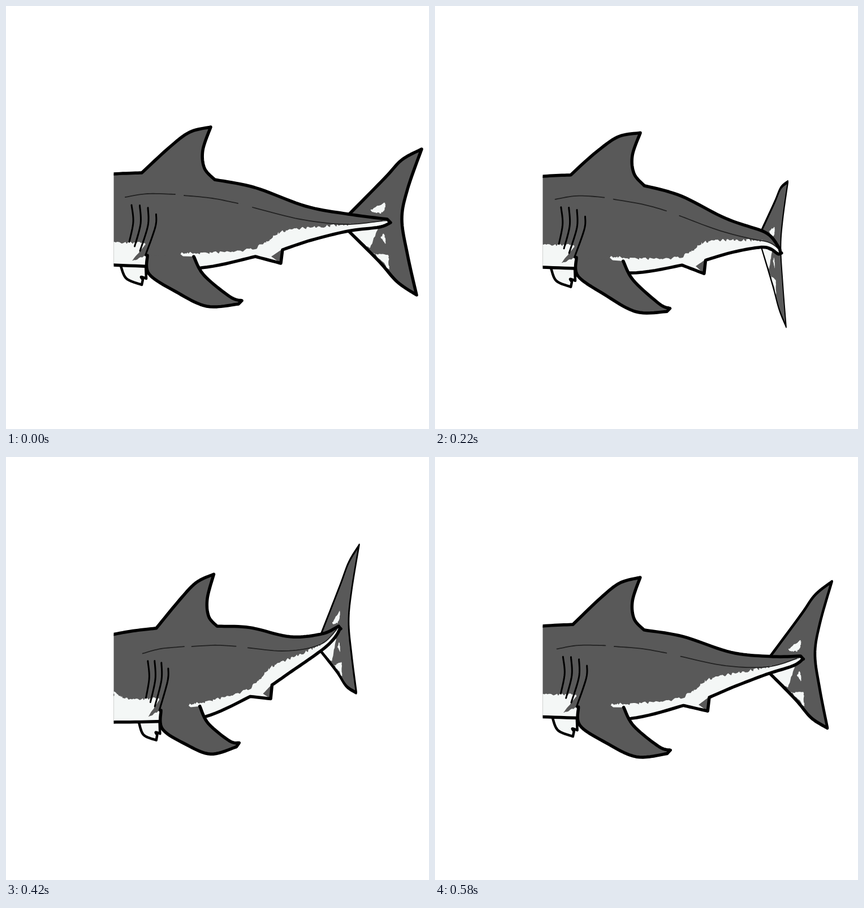
Write an HTML page with a canvas that moves like this. It is 748 px wide and 748 px high and loops after 600 ms.

```html
<!DOCTYPE html>
<html lang="en">
<head>
<meta charset="utf-8">
<title>Swimming shark</title>
<style>
html, body { margin: 0; width: 100%; height: 100%; overflow: hidden; background: #fff; }
canvas { display: block; width: 748px; height: 748px; }
</style>
</head>
<body>
<canvas id="stage" width="748" height="748"></canvas>
<script>
const ctx = document.getElementById('stage').getContext('2d');
const GREY = '#595959', WHITE = '#f4f7f6', INK = '#000';
const LOOP = 600, STEP = 20, CUT = 190.5, ROOT = 607;

// Monotone cubic interpolation
function pchip(xs, ys) {
  const n = xs.length, d = [], m = [];
  for (let i = 0; i < n - 1; i++) d[i] = (ys[i + 1] - ys[i]) / (xs[i + 1] - xs[i]);
  for (let i = 1; i < n - 1; i++) {
    const turn = d[i - 1] * d[i];
    m[i] = turn > 0 ? 2 * turn / (d[i - 1] + d[i]) : 0;
  }
  m[0] = d[0];
  m[n - 1] = d[n - 2];
  return x => {
    if (x <= xs[0]) return ys[0];
    if (x >= xs[n - 1]) return ys[n - 1];
    let i = 0;
    while (x > xs[i + 1]) i++;
    const h = xs[i + 1] - xs[i], u = (x - xs[i]) / h, v = 1 - u;
    return ys[i] * (1 + 2 * u) * v * v + ys[i + 1] * u * u * (3 - 2 * u)
      + h * u * v * (m[i] * v - m[i + 1] * u);
  };
}

// Full bend of the spine, downwards and upwards
const SPINE = [140, 250, 370, 487, 605, 678];
const bend = (dx, dy, shear) => ({ dx: pchip(SPINE, dx), dy: pchip(SPINE, dy), shear });
const DOWN = bend([14, 0, 2, -19, -54, -96], [8, 7, 20, 34, 53, 77], .3);
const UP = bend([43, 24, 4, -21, -63, -110], [13, 7, -8, -32, -70, -99], -.39);

// Time, then amount of bend at chest, tail root and tail tip, then tail squeeze
const keys = [
  [0, 0, 0, 0, 0],
  [110, 1.05, 1.05, 1.05, .6],
  [140, 1, 1, 1, .59],
  [220, .54, .54, .7, .635],
  [300, 0, 0, 0, 0],
  [420, -1, -.78, -.8, .475],
  [500, -1, -1, -1, .63],
  [540, -.89, -.89, -.89, .54],
  [580, -.15, -.22, -.26, .15]
];
const shift = ([t, ...rest], by) => [t + by, ...rest];
const track = [shift(keys[8], -LOOP), ...keys, shift(keys[0], LOOP), shift(keys[1], LOOP)];
const channels = [1, 2, 3, 4].map(i => pchip(track.map(k => k[0]), track.map(k => k[i])));

function catmull(a, b, c, e, u) {
  const cubic = 3 * (b - c) + e - a, square = 2 * a - 5 * b + 4 * c - e;
  return b + .5 * u * (c - a + u * (square + u * cubic));
}

// Smooth curve through "x,y" points; "|" marks a corner
function curve(text, steps = 10) {
  const out = [];
  let last = null;
  for (const part of text.split('|')) {
    const p = part.trim().split(/\s+/).map(s => s.split(',').map(Number));
    if (last) p.unshift(last);
    last = p[p.length - 1];
    for (let i = 0; i < p.length - 1; i++) {
      const a = p[Math.max(i - 1, 0)], b = p[i], c = p[i + 1], e = p[Math.min(i + 2, p.length - 1)];
      for (let k = 0; k < steps; k++) out.push([0, 1].map(j => catmull(a[j], b[j], c[j], e[j], k / steps)));
    }
  }
  out.push(last);
  return out;
}

let seed = 7;
const rand = () => (seed = seed * 16807 % 2147483647) / 2147483647;
const rough = (pts, size) => pts.map(([x, y]) =>
  [x + (rand() - .5) * size * .6, y + (rand() - .5) * size]);

const body = curve(`140,302 190,297 240,295 | 290,249 325,223 362,214 | 348,255 351,287 369,307
  | 440,321 530,354 605,368 674,377 | 680,383 | 660,391 605,398 540,414 489,431 | 486,455 | 441,443
  | 345,463 240,460 140,456`);
const belly = [
  ...rough(curve('310,437 370,436 440,428 490,398 550,391 610,386', 24), 5),
  ...curve('610,386 676,380 | 682,395 | 490,465 | 345,470 | 310,440')
];
const throat = [...rough(curve('140,394 177,416 246,419', 24), 4), ...curve('250,465 | 140,465')];
const streak = rough(curve('247,422 | 222,451 | 248,441'), 2.5);
const pectoral = curve('250,441 253,474 300,505 355,531 411,527 | 417,521 | 396,514 350,476 332,443');
const farFin = curve('203,460 213,482 240,493 | 242,484 | 239,479 248,482 | 247,458');
const pelvic = curve('487,431 469,443 | 486,455');
const sideLine = ['211,338 250,332 299,333', '315,335 365,340 410,349',
  '436,356 520,377 600,386 665,380'].map(s => curve(s));
const gills = [0, 1, 2, 3].map(i => curve(
  `${222 + 14.5 * i},${352 + .6 * i ** 3} ${225 + 13 * i},${382 + 3 * i} ${218 + 9.5 * i},${417 + 8 * i}`));
const tail = curve(`607,368 670,304 700,272 735,253 | 710,324 700,377 710,440 726,511
  | 692,488 660,452 607,399`);
const spots = ['644,362 670,347 | 671,356 663,366 644,362', '607,396 658,393 | 643,429 | 607,398',
  '663,410 668,402 671,420 663,410', '651,438 676,440 | 678,466 | 651,438'].map(s => rough(curve(s), 3));

let warp;
const flat = p => p;

function trace(pts, map) {
  ctx.beginPath();
  for (const p of pts) ctx.lineTo(...map(p));
}
function fill(pts, color, map = warp) {
  trace(pts, map);
  ctx.fillStyle = color;
  ctx.fill();
}
function line(pts, width, color = INK, map = warp) {
  trace(pts, map);
  ctx.lineWidth = width;
  ctx.strokeStyle = color;
  ctx.stroke();
}

function drawTail(tip, squeeze) {
  const [x, y] = warp([ROOT, 0]), sx = 1 - squeeze;
  const shear = (tip > 0 ? DOWN : UP).shear * Math.abs(tip) ** .8;
  ctx.save();
  ctx.transform(sx, shear, 0, 1, x - ROOT * sx, y - ROOT * shear);
  fill(tail, GREY, flat);
  for (const s of spots) fill(s, WHITE, flat);
  line(tail, 5.5, INK, flat);
  ctx.restore();
}

function drawBody() {
  fill(body, GREY);
  ctx.save();
  trace(body, warp);
  ctx.clip();
  fill(belly, WHITE);
  fill(throat, WHITE);
  fill(streak, GREY);
  fill(pelvic, GREY);
  const [x, y] = warp([147, 408]);
  ctx.beginPath();
  ctx.arc(x, y, 2.6, 0, 7);
  ctx.fillStyle = INK;
  ctx.fill();
  ctx.restore();
  for (const s of sideLine) line(s, 1.8, '#222');
  for (const g of gills) line(g, 3);
  line(body, 5.5);
}

function draw(t) {
  const [chest, root, tip, squeeze] = channels.map(f => f(t));
  const amount = pchip([370, 605, 678], [chest, root, tip]);
  warp = ([x, y]) => {
    const a = amount(x), b = a > 0 ? DOWN : UP;
    return [x + Math.abs(a) * b.dx(x), y + Math.abs(a) * b.dy(x)];
  };

  ctx.fillStyle = '#fff';
  ctx.fillRect(0, 0, 748, 748);
  ctx.save();
  ctx.beginPath();
  ctx.rect(CUT, 0, 748, 748);
  ctx.clip();
  ctx.lineJoin = ctx.lineCap = 'round';
  drawTail(tip, squeeze);
  fill(farFin, WHITE);
  line(farFin, 4.5);
  drawBody();
  fill(pectoral, GREY);
  line(pectoral, 5.5);
  ctx.restore();
}

const start = performance.now();
function tick() {
  const t = Math.max(0, performance.now() - start) % LOOP;
  draw(Math.floor(t / STEP) * STEP);
  requestAnimationFrame(tick);
}
tick();
</script>
</body>
</html>
```
